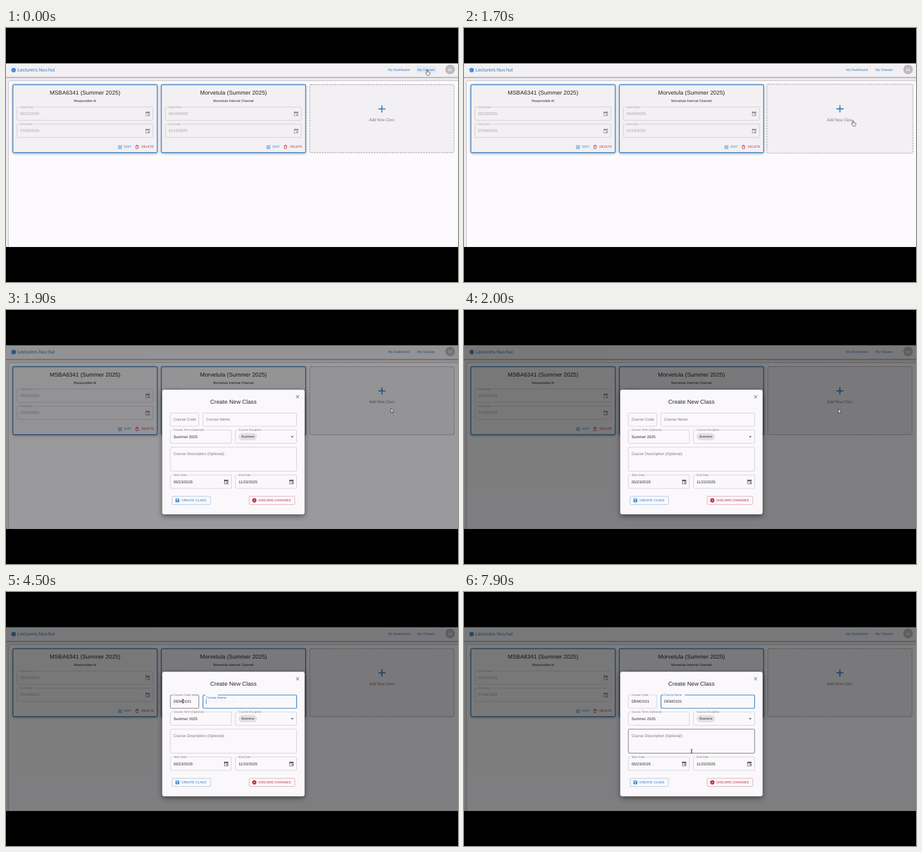
An HTML page for the animation above (8000 ms loop, 800 px wide and 450 px high).

```html
<!DOCTYPE html>
<html lang="en">
<head>
<meta charset="utf-8">
<title>Create a class</title>
<style>
html, body { margin: 0; width: 100%; height: 100%; overflow: hidden; background: #000; }
svg { display: block; width: 800px; height: 450px; }
text { font-family: "Liberation Sans", Arial, sans-serif; letter-spacing: .045px; text-rendering: geometricPrecision; white-space: pre; }
.mid { text-anchor: middle; }
.hint { font-family: Lato, sans-serif; font-style: italic; letter-spacing: .1px; }
.bar { filter: drop-shadow(0 1px 1.2px #0007); }
.panel { filter: drop-shadow(0 0 1.5px #0006); }
.card { filter: drop-shadow(0 1.5px 2px #0005); }
.dialog { filter: drop-shadow(0 3px 5px #0007); }
.link-bg, .add, .shade, .modal, .pointer, .hand, .arrow, .beam { animation: 8s step-end infinite; }
.link-bg { animation-name: link; }
.add { animation-name: lift; transform-origin: 665.3px 160.7px; }
.shade { animation-name: shade; }
.modal { animation-name: modal; }
.pointer { animation-name: travel; animation-timing-function: ease-in-out; }
.hand { animation-name: hand; }
.arrow { animation-name: arrow; }
.beam { animation-name: beam; }
@keyframes link { 0% { opacity: 1 } 16.2%, 100% { opacity: 0 } }
@keyframes lift { 0% { transform: none } 20% { transform: scale(1.013) } 23.7%, 100% { transform: none } }
@keyframes shade { 0% { opacity: 0 } 22.45% { opacity: .08 } 23.7% { opacity: .39 } 24.95%, 100% { opacity: .5 } }
@keyframes modal { 0% { visibility: hidden } 22.45%, 100% { visibility: visible } }
@keyframes travel {
  0% { transform: translate(745.5px, 74px) }
  15% { transform: translate(744.5px, 73.5px) }
  21%, 22.6% { transform: translate(688.7px, 164px) }
  23.7% { transform: translate(681.3px, 174.4px) }
  32%, 86% { transform: translate(313px, 193.5px) }
  95%, 100% { transform: translate(402.8px, 282px) }
}
@keyframes hand { 0% { opacity: 1 } 16.2% { opacity: 0 } 20% { opacity: 1 } 22.45%, 100% { opacity: 0 } }
@keyframes arrow { 0% { opacity: 0 } 16.2% { opacity: 1 } 20% { opacity: 0 } 22.45% { opacity: 1 } 31.2%, 100% { opacity: 0 } }
@keyframes beam { 0% { opacity: 0 } 31.2%, 100% { opacity: 1 } }
</style>
</head>
<body>
<svg id="stage" viewBox="0 0 800 450"></svg>
<script>
const BLUE = '#2b7ac4', RED = '#bd2638', INK = '#242326';
const CARD = '#f2f0f3', SHEET = '#faf8fb', LINE = '#c3c1c5', LABEL = '#737176', FAINT = '#a19fa3';

const text = (x, y, size, str, fill = INK, attrs = '') =>
  `<text x="${x}" y="${y}" font-size="${size}" fill="${fill}" ${attrs}>${str}</text>`;

const rect = (x, y, w, h, r, attrs) =>
  `<rect x="${x}" y="${y}" width="${w}" height="${h}" rx="${r}" ${attrs}/>`;

const box = (x, y, w, h, attrs = '') =>
  rect(x, y, w, h, 1.7, `fill="none" stroke="${LINE}" stroke-width=".7" ${attrs}`);

const calendar = (x, y, fill) => `<g transform="translate(${x} ${y})" fill="${fill}">
  <path fill-rule="evenodd" d="M-3.7-3.3h1.1v-1h.9v1h3.4v-1h.9v1h1.1v7.5h-7.4zM-2.9-.9v4.3h5.8v-4.3z"/>
  <path d="M.3.7h2v2h-2z"/></g>`;

// Outlined field with its label resting in the top border
const field = (x, y, w, label, gap, value, bg, ink, tone) =>
  box(x, y, w, 23.7) +
  `<path d="M${x + 4.3} ${y}h${gap}" stroke="${bg}" stroke-width="1.6"/>` +
  text(x + 5.8, y + 1.7, 5.04, label, tone) +
  text(x + 5.5, y + 14.2, 6.72, value, ink);

const dates = (x, y, w, label, gap, value, bg, ink, tone, icon) =>
  field(x, y, w, label, gap, value, bg, ink, tone) + calendar(x + w - 9.2, y + 12, icon);

const card = (x, title, note, start, end) => `<g transform="translate(${x} 100.5)">
  ${rect(0, 0, 255.3, 120.3, 2, `class="card" fill="${CARD}" stroke="#3c84c6" stroke-width="1.4"`)}
  ${text(127.6, 17.6, 10.1, title, INK, 'class="mid"')}
  ${text(127.6, 30.6, 5.88, note, INK, 'class="mid"')}
  ${dates(7.2, 39.4, 240.5, 'Start Date', 26, start, CARD, FAINT, FAINT, '#8d8b8f')}
  ${dates(7.2, 69.7, 240.5, 'End Date', 24, end, CARD, FAINT, FAINT, '#8d8b8f')}
  <g fill="none" stroke-width=".8">
    <path stroke="${BLUE}" d="M189.5 107.8h-2.6v5.4h5.2v-2.6M188.6 111.3l.4-1.4 2.9-2.6 1 1-2.9 2.7z"/>
    <path stroke="${RED}" d="M216.8 108.6h5.6M218.4 108.4v-1.2h2.4v1.2M217.6 108.8v4.4h4v-4.4"/>
  </g>
  ${text(197, 111.7, 5.46, 'EDIT', BLUE)}
  ${text(227.8, 111.7, 5.46, 'DELETE', RED)}
</g>`;

const page = `
  ${rect(0, 62.5, 800, 326, 0, 'fill="#f0eef1"')}
  ${rect(5, 94, 805, 310, 3, 'class="panel" fill="#fcfafd"')}
  ${rect(-4, 62.5, 808, 24.3, 0, 'class="bar" fill="#f2f0f3"')}
  <circle cx="13.5" cy="74.6" r="4.1" fill="#4c90cf"/>
  ${text(20.2, 76.5, 8.4, 'Lecturers.Nuv.hut', BLUE)}
  ${rect(725, 67.8, 37, 11.6, 1.7, 'class="link-bg" fill="#e3eaf2"')}
  ${text(676.2, 75.6, 5.88, 'My Dashboard', BLUE)}
  ${text(728.3, 75.6, 5.88, 'My Classes', BLUE)}
  <circle cx="786" cy="73.5" r="8.5" fill="#bcbabd"/>
  ${text(786, 76.6, 8.4, 'M', '#f8f6f9', 'class="mid"')}
  ${card(12.3, 'MSBA6341 (Summer 2025)', 'Responsible AI', '05/22/2025', '07/03/2025')}
  ${card(275, 'Morvetula (Summer 2025)', 'Morvetula Internal Channel', '05/19/2025', '11/19/2025')}
  <g class="add">
    ${rect(537.6, 100.4, 255.4, 120.5, 2, `fill="${CARD}" stroke="#a3a1a5" stroke-width="1.1" stroke-dasharray="3 1.6"`)}
    <path d="M659 143.4h12.6M665.3 137.1v12.6" stroke="${BLUE}" stroke-width="1.8"/>
    ${text(665.3, 165.4, 7.1, 'Add New Class', '#77757a', 'class="hint mid"')}
  </g>`;

const form = `
  ${rect(276.5, 141.2, 252, 220.8, 4, `class="dialog" fill="${SHEET}"`)}
  ${text(402.5, 165.6, 10.1, 'Create New Class', INK, 'class="mid"')}
  <path d="M513.4 151l5.4 5.4m0-5.4l-5.4 5.4" stroke="#555358"/>
  <g id="code"></g><g id="name"></g>
  ${field(290.9, 212.5, 108, 'Course Term (Optional)', 55, 'Summer 2025', SHEET, INK, LABEL)}
  ${field(406, 212.5, 108.4, 'Course Discipline', 41.5, '', SHEET, INK, LABEL)}
  ${rect(411.8, 218, 32.4, 13, 6.5, 'fill="#e2e0e3"')}
  ${text(417, 226.4, 5.46, 'Business')}
  <path d="M504.2 223.4h5l-2.5 2.5z" fill="#58565b"/>
  ${box(290.9, 243, 223.5, 42.6, 'id="about"')}
  ${text(296.4, 256.8, 6.72, 'Course Description (Optional)', LABEL)}
  ${dates(290.9, 292.3, 108, 'Start Date', 26, '05/23/2025', SHEET, INK, LABEL, '#58565b')}
  ${dates(406, 292.3, 108.4, 'End Date', 24, '11/23/2025', SHEET, INK, LABEL, '#58565b')}
  ${rect(294, 330.1, 68, 14.5, 1.7, 'fill="none" stroke="#8eb7de" stroke-width=".7"')}
  <path fill="${BLUE}" fill-rule="evenodd" d="M300.1 334h5l1.5 1.5v5h-6.5zM301 334.9v1.7h3.8v-1.7zM303.3 337.4a1.1 1.1 0 1 0 .1 0z"/>
  ${text(310.4, 339.4, 5.8, 'CREATE CLASS', BLUE)}
  ${rect(430.5, 330.1, 80.5, 14.5, 1.7, 'fill="none" stroke="#d78d97" stroke-width=".7"')}
  <circle cx="439.5" cy="337.3" r="3.7" fill="${RED}"/>
  <path d="M438.1 335.9l2.8 2.8m0-2.8l-2.8 2.8" stroke="#fff" stroke-width=".8"/>
  ${text(447, 339.4, 5.8, 'DISCARD CHANGES', RED)}`;

const pointer = `<g class="pointer" fill="#fff" stroke="#2a2a2c" stroke-width=".8" stroke-linejoin="round">
  <path class="hand" d="M-.9 5.6V.7q.9-1 1.7 0v3l3.4.6q.9.3.8 1.4l-.6 2.6-.8 1.4H-.2L-2.7 6.3q0-1.1 1-.9z"/>
  <path class="arrow" d="M0 0v7.3l1.7-1.5 1.2 2.7 1.3-.6-1.2-2.6h2.2z"/>
  <path class="beam" fill="none" d="M-1.5-3.5q1.5 0 1.5.7v5.6q0 .7-1.5.7M1.5-3.5Q0-3.5 0-2.8v5.6q0 .7 1.5.7"/>
</g>`;

const $ = id => document.getElementById(id);
$('stage').innerHTML = page +
  rect(0, 62.5, 800, 326, 0, 'class="shade"') +
  `<g class="modal">${form}</g>` +
  rect(0, 0, 800, 62.5, 0, '') + rect(0, 388, 800, 62, 0, '') + pointer;

const WORD = 'DEMO101', TOP = 182.5;
const inputs = [
  { id: 'code', x: 290.9, w: 50.3, gap: 33, label: 'Course Code', hint: '',
    focus: 2600, blur: 4430, keys: [2800, 2900, 3000, 3100, 3600, 3700, 3900] },
  { id: 'name', x: 348.6, w: 165.8, gap: 38, label: 'Course Name', hint: 'Introduction to AI',
    focus: 4430, blur: 8000, keys: [5300, 5400, 5500, 5600, 6000, 6100, 6300] }
];

function drawInput(f, t) {
  const active = t >= f.focus && t < f.blur;
  const p = Math.min(1, Math.max(0, (t - f.focus) / 200));
  const float = 1 - (1 - p) ** 2;
  const pressed = f.keys.filter(k => k <= t);
  const value = WORD.slice(0, pressed.length);
  const hovered = f.id === 'code' && t >= 2500 && t < 7000;
  const edge = active ? BLUE : hovered ? '#3a383c' : LINE;
  const tx = f.x + 5.5;

  $(f.id).innerHTML =
    rect(f.x, TOP, f.w, 23.5, 1.7, `fill="none" stroke="${edge}" stroke-width="${active ? 1.2 : .7}"`) +
    `<path d="M${f.x + 4.3} ${TOP}h${f.gap * float}" stroke="${SHEET}" stroke-width="1.8"/>` +
    (active && !value ? text(tx, 196.4, 6.72, f.hint, INK, `opacity="${.42 * p * p}"`) : '') +
    text(tx, 196.4 - 12.2 * float, 6.72 - 1.68 * float, f.label, active ? BLUE : LABEL) +
    text(tx, 196.4, 6.72, value, INK, 'class="value"');

  const last = pressed.at(-1) ?? f.focus;
  if (active && Math.floor((t - last) / 500) % 2 === 0) {
    const end = tx + $(f.id).querySelector('.value').getComputedTextLength() + .3;
    $(f.id).innerHTML += `<path d="M${end} 190v8" stroke="${INK}" stroke-width=".6"/>`;
  }
}

let shown = -1;
function tick(now) {
  const t = Math.floor(now % 8000 / 100) * 100;
  if (t !== shown) {
    shown = t;
    inputs.forEach(f => drawInput(f, t));
    $('about').setAttribute('stroke', t >= 7300 ? '#3a383c' : LINE);
  }
  requestAnimationFrame(tick);
}
tick(performance.now());
</script>
</body>
</html>
```
